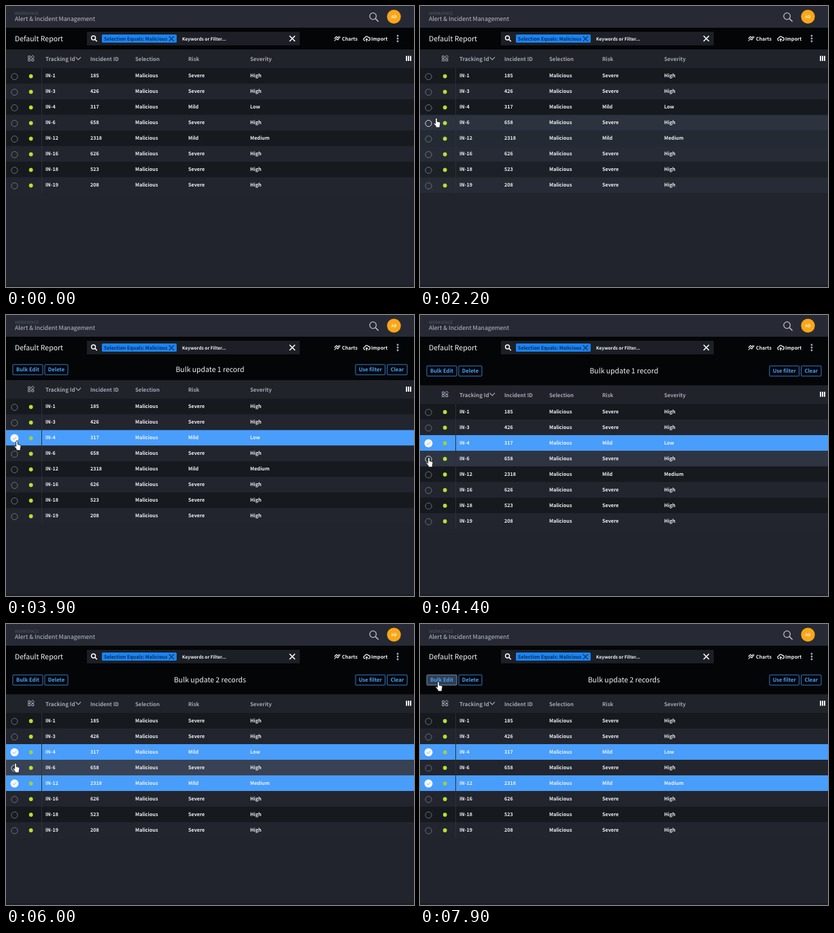
Write an HTML page that moves like this. It is 600 px wide and 414 px high and loops after 8000 ms.

```html
<!DOCTYPE html>
<html lang="en">
<head>
<meta charset="utf-8">
<title>Bulk update</title>
<style>
html, body { margin: 0; width: 100%; height: 100%; overflow: hidden; background: #21242d; }
svg { display: block; }
text { font-family: "Noto Sans CJK JP", "Noto Sans CJK SC", "Noto Sans", sans-serif; text-rendering: geometricPrecision; white-space: pre; }
.line { fill: none; }
</style>
</head>
<body>
<svg id="stage" width="600" height="414" viewBox="0 0 600 414"></svg>
<script>
const LOOP = 8000, STEP = 100, FADE = 400;
const ROW_TOP = 91.5, ROW_H = 23;
const COLS = [58, 124, 190, 268, 359];
const HEADS = ['Tracking Id', 'Incident ID', 'Selection', 'Risk', 'Severity'];
const ROWS = [
  ['IN-1', 185, 'Severe', 'High'],
  ['IN-3', 426, 'Severe', 'High'],
  ['IN-4', 317, 'Mild', 'Low'],
  ['IN-6', 658, 'Severe', 'High'],
  ['IN-12', 2318, 'Mild', 'Medium'],
  ['IN-16', 626, 'Severe', 'High'],
  ['IN-18', 523, 'Severe', 'High'],
  ['IN-19', 208, 'Severe', 'High']
].map(([id, num, risk, sev]) => [id, num, 'Malicious', risk, sev]);

// Click times by row index
const PICKED = { 2: 3300, 4: 4900 };

// Pointer: time, x, y
const PATH = [
  [1500, 75, 390], [1800, 50, 325], [1950, 34, 238], [2010, 30, 207],
  [2110, 26, 184], [2200, 24, 165], [2300, 21, 159], [2700, 15, 151],
  [3100, 11, 147], [3300, 11, 147], [3480, 14, 175], [3700, 16, 185],
  [4200, 16, 186], [4400, 13, 210], [4600, 12, 238], [5600, 12, 239],
  [6000, 14, 205], [6400, 24, 125], [6800, 28, 92], [7000, 28, 92],
  [7200, 27, 86], [7500, 27, 85]
];

const DARK = [22, 25, 30], LIGHT = [34, 37, 46];
const HOVER = [78, 93, 118], BLUE = [73, 157, 251];

const clamp = v => Math.max(0, Math.min(1, v));
const ramp = (t, from, len) => clamp((t - from) / len);
const ease = p => p * p * (3 - 2 * p);
const mix = (a, b, p) => a.map((v, i) => v + (b[i] - v) * p);
const rgb = c => `rgb(${c.map(Math.round)})`;

const text = (x, y, size, str, fill = '#f1f3f6', weight = 700, extra = '') =>
  `<text x="${x}" y="${y}" font-size="${size}" font-weight="${weight}" fill="${fill}" ${extra}>${str}</text>`;
const rect = (x, y, w, h, fill, extra = '') =>
  `<rect x="${x}" y="${y}" width="${w}" height="${h}" fill="${fill}" ${extra}/>`;
const circle = (x, y, r, fill, extra = '') =>
  `<circle cx="${x}" cy="${y}" r="${r}" fill="${fill}" ${extra}/>`;
const line = (d, color, width = 1, extra = '') =>
  `<path class="line" d="${d}" stroke="${color}" stroke-width="${width}" ${extra}/>`;
const cross = (x, y, r, color, width) =>
  line(`M${x - r} ${y - r}l${2 * r} ${2 * r}m0 ${-2 * r}l${-2 * r} ${2 * r}`, color, width);
const button = (x, w, label, id) =>
  rect(x, 73, w, 15, '#04060a', `id="${id}" stroke="#3478c6" rx="1"`) +
  text(x + w / 2, 83.4, 7.7, label, '#4da0f8', 700, 'text-anchor="middle"');

function topBar() {
  return rect(0, 0, 600, 32, '#272a34') +
    text(13, 12.6, 6, 'WORKSPACE', '#555a66', 400) +
    text(13, 22, 8.72, 'Alert &amp; Incident Management', '#bcc1ca', 400) +
    circle(539.7, 15, 4.8, 'none', 'stroke="#b9bdc6" stroke-width="1.3"') +
    line('M543.3 18.6l4.4 4.4', '#b9bdc6', 1.5) +
    circle(570.5, 15.8, 10.2, '#faa61a') +
    text(570.5, 18.3, 6, 'AD', '#fff0cc', 700, 'text-anchor="middle"');
}

function toolBar() {
  return rect(0, 32, 600, 80, '#040506') +
    text(13, 52.3, 10.5, 'Default Report', '#f4f5f7', 400) +
    rect(119, 38, 313, 20, '#1c1f26') +
    circle(128.6, 47, 3, 'none', 'stroke="#fff" stroke-width="1.4"') +
    line('M130.8 49.3l3 3', '#fff', 1.6) +
    rect(141, 42, 110, 12, '#1a84f5', 'rx="1.5"') +
    text(144, 50.5, 7.02, 'Selection Equals: Malicious', '#0b2c57') +
    cross(243.3, 48.2, 3.6, '#0b2c57', 1.2) +
    text(259, 50.5, 6.55, 'Keywords or Filter...') +
    cross(421, 48, 4, '#fff', 1.6) +
    line('M483 51.5l3-3.5 2 2 3.5-5M483 48l3-3 2 2 2-2.5', '#fff', 1.1) +
    text(494, 50.8, 7.1, 'Charts') +
    line('M528.4 51h-.4a2 2 0 0 1-.2-4 2.8 2.8 0 0 1 5.2-.6 2.3 2.3 0 0 1 .2 4.6h-.8M530.4 52.5v-4.2m-1.6 1.5l1.6-1.6 1.6 1.6', '#fff', 1.1) +
    text(537, 50.8, 7.05, 'Import') +
    [44, 48, 52].map(y => circle(576, y, 1.4, '#9fabc0')).join('');
}

function bulkBar() {
  return '<g id="bulk">' +
    button(10, 44, 'Bulk Edit', 'edit') + button(57, 34, 'Delete', 'del') +
    button(514, 43.5, 'Use filter', 'use') + button(560.5, 29.5, 'Clear', 'clear') +
    text(300, 84.3, 10.47, '', '#f1f3f6', 400, 'id="count" text-anchor="middle"') + '</g>';
}

function row(cells, i) {
  const y = ROW_TOP + i * ROW_H;
  return rect(0, y, 600, ROW_H, rgb(i % 2 ? LIGHT : DARK), `id="row${i}"`) +
    circle(12.5, y + 12.5, 4.6, 'none', `id="ring${i}" stroke="#6c717b"`) +
    `<g id="tick${i}">` + circle(12.5, y + 12, 6, '#f6f8fb') +
    line(`M10 ${y + 12.2}l1.8 1.8 3.4-3.8`, '#8fb6e0', 1) + '</g>' +
    circle(36.7, y + 12, 2.9, '#b2e235', `id="dot${i}"`) +
    cells.map((c, k) => text(COLS[k], y + 13.6, 7.2, c)).join('');
}

function table() {
  const grey = '#a3a8b1';
  return '<g id="table">' + rect(0, 64, 600, 350, '#21242d') + rect(0, 64.5, 600, 27, '#20232a') +
    line('M32.7 73.7h3v3h-3zM32.7 78h3v3h-3zM37.8 78h3v3h-3zM39.3 72.7l2.2 2.4-2.2 2.4-2.2-2.4z', grey, 1) +
    HEADS.map((h, k) => text(COLS[k], 81.2, k ? 7.8 : 8, h, grey)).join('') +
    line('M102.5 75.3l3.8 3.8 3.8-3.8', grey, 1.2) +
    [588, 591, 594].map(x => rect(x, 73.5, 2, 7.5, '#f1f3f6')).join('') +
    ROWS.map(row).join('') +
    line(`M52.5 91.5v${ROW_H * ROWS.length}`, '#2b303a') + '</g>';
}

const POINTER = 'fill="#fff" stroke="#08090c" stroke-width=".8" stroke-linejoin="round"';
document.getElementById('stage').innerHTML =
  toolBar() + topBar() + bulkBar() + table() + rect(0, 411, 600, 3, '#1c1f26') +
  `<path id="hand" ${POINTER} d="M-1.3 1.2A1.3 1.3 0 0 1 1.3 1.2V5.2L5 6Q6.2 6.4 6 8L5.2 11.6V14H-.8V12L-3.8 8.4Q-4.4 7-3 7L-1.3 8.4Z"/>` +
  `<path id="arrow" ${POINTER} d="M0 0V10.5L2.4 8.2L4.2 12L5.8 11.3L4.1 7.6H7.3Z"/>`;

const el = {};
document.querySelectorAll('#stage [id]').forEach(n => el[n.id] = n);
const set = (id, name, value) => el[id].setAttribute(name, value);
const show = (id, on) => set(id, 'visibility', on ? 'visible' : 'hidden');

const shift = t => 32 * ease(ramp(t, 3250, 400)) + 7.5 * ease(ramp(t, 4150, 250));

function pointer(t) {
  if (t < PATH[0][0]) return null;
  const n = PATH.findIndex(k => k[0] > t);
  if (n < 0) return PATH[PATH.length - 1].slice(1);
  const a = PATH[n - 1], b = PATH[n];
  return mix(a, b, ramp(t, a[0], b[0] - a[0])).slice(1);
}

function rowAt(t) {
  const p = pointer(t);
  return p ? Math.floor((p[1] - ROW_TOP - shift(t)) / ROW_H) : -1;
}

// Share of the last FADE ms spent over each row
function hoverLevels(t) {
  const n = 40, levels = ROWS.map(() => 0);
  for (let i = 0; i < n; i++) {
    const r = rowAt(t - (i + 0.5) * FADE / n);
    if (r in levels) levels[r] += 1 / n;
  }
  return levels;
}

function draw(t) {
  const h = shift(t), p = pointer(t), over = rowAt(t), levels = hoverLevels(t);
  set('table', 'transform', `translate(0 ${h})`);
  show('bulk', h > 0);
  set('bulk', 'transform', `translate(0 ${(h - 32) * 0.27})`);
  el.count.textContent = t < PICKED[4] ? 'Bulk update 1 record' : 'Bulk update 2 records';

  ROWS.forEach((_, i) => {
    const at = PICKED[i] || Infinity, on = t >= at;
    const base = mix(i % 2 ? LIGHT : DARK, HOVER, levels[i]);
    set('row' + i, 'fill', rgb(mix(base, BLUE, on ? ramp(t, at, FADE) : 0)));
    set('ring' + i, 'stroke', i === over ? '#d3d8e0' : '#6c717b');
    show('ring' + i, !on);
    show('tick' + i, on);
    set('dot' + i, 'fill', on ? '#9fce45' : '#b2e235');
  });

  const press = 0.85 * ramp(t, 7000, 200) + 0.15 * ramp(t, 7800, 100);
  set('edit', 'fill', rgb(mix([4, 6, 10], [48, 62, 82], press)));
  set('edit', 'stroke', rgb(mix([52, 120, 198], [112, 138, 170], press)));

  const onRow = over >= 0 && over < ROWS.length;
  const hand = p && (onRow || p[1] < 90);
  show('hand', hand);
  show('arrow', p && !hand);
  if (p) set(hand ? 'hand' : 'arrow', 'transform', `translate(${p})`);
}

const start = performance.now();
function tick() {
  const t = (performance.now() - start) % LOOP;
  draw(Math.floor(t / STEP) * STEP);
  requestAnimationFrame(tick);
}
tick();
</script>
</body>
</html>
```
